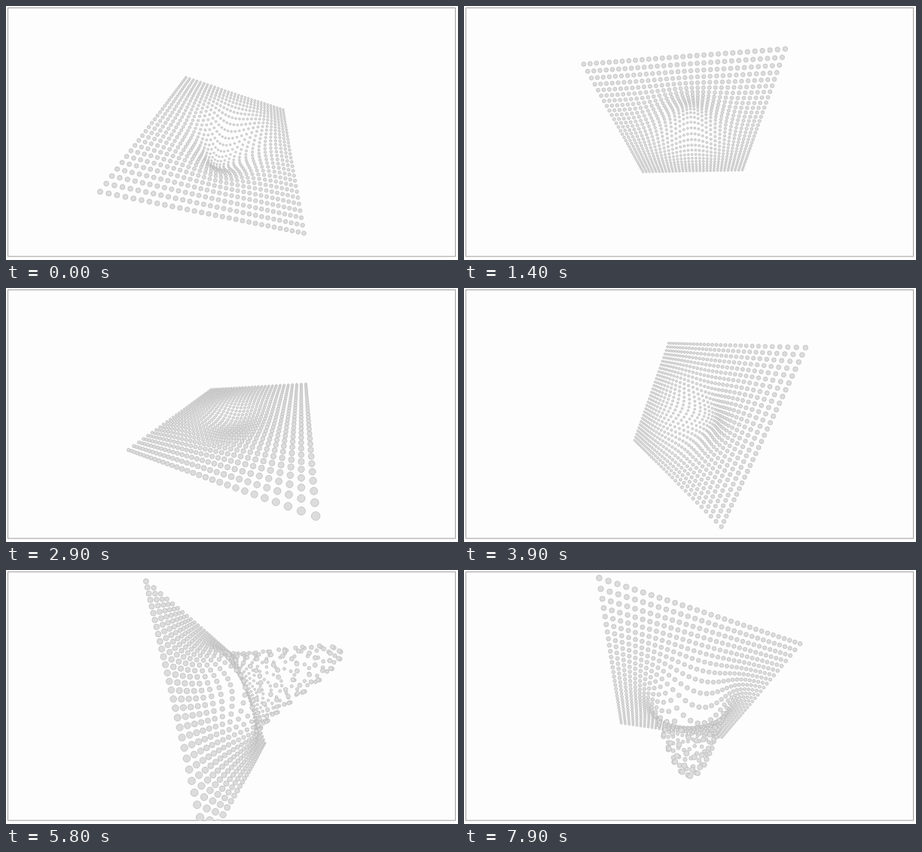
An HTML page with a canvas for the animation above (8000 ms loop, 600 by 338 pixels).

```html
<!DOCTYPE html>
<html lang="en">
<head>
<meta charset="utf-8">
<title>Rotating dot surface</title>
<style>
html, body { margin: 0; width: 100%; height: 100%; overflow: hidden; background: #fdfdfd; }
canvas { display: block; width: 600px; height: 338px; }
</style>
</head>
<body>
<canvas id="stage" width="600" height="338"></canvas>
<script>
const ctx = document.getElementById("stage").getContext("2d");
const { sin, cos, exp, floor, max, PI } = Math;

const LOOP = 8000, STEP = 100;
const HALF = 15;              // the grid runs from -HALF to HALF - 1
const CAMERA = 26.7;          // camera distance in grid cells
const FOCAL = 166;            // focal length in pixels
const CENTER = [299.5, 168];
const DOT = 0.365;            // dot radius in cells, outline included
const OUTLINE = 0.6;
const PEAK = 20.2;            // greatest bump height in cells
const SPREAD = 39;            // squared bump width in cells
const LIFT = 0.2;             // distance of the sheet from the pivot

// Axes of the sheet at time t: x right, y down, z towards the viewer.
function axes(t) {
  const tilt = -0.307 + 0.271 * t;
  const turn = 2.733 - 0.4375 * t;
  const spin = 1.068 - 0.5323 * t;
  const e = [sin(tilt), -cos(tilt) * cos(turn), -cos(tilt) * sin(turn)];
  const g = [0, sin(turn), -cos(turn)];
  return {
    u: [cos(tilt), sin(tilt) * cos(turn), sin(tilt) * sin(turn)],
    v: e.map((c, i) => cos(spin) * c + sin(spin) * g[i]),
    n: e.map((c, i) => sin(spin) * c - cos(spin) * g[i])
  };
}

function surface(t) {
  const { u, v, n } = axes(t);
  const height = -PEAK * cos(0.43 * (t - 6.22));
  const dots = [];
  for (let i = -HALF; i < HALF; i++) {
    for (let j = -HALF; j < HALF; j++) {
      const h = LIFT + height * exp(-(i * i + j * j) / SPREAD);
      const [x, y, z] = u.map((c, k) => i * c - j * v[k] + h * n[k]);
      const scale = FOCAL / (CAMERA - z);
      dots.push({ x: CENTER[0] + x * scale, y: CENTER[1] + y * scale, r: DOT * scale, z });
    }
  }
  return dots.sort((a, b) => a.z - b.z);
}

function draw(t) {
  ctx.fillStyle = "#fdfdfd";
  ctx.fillRect(0, 0, 600, 338);
  ctx.lineWidth = 1;
  ctx.strokeStyle = "#a0a0a0";
  ctx.strokeRect(2.5, 2.5, 594, 330.7);

  ctx.save();
  ctx.beginPath();
  ctx.rect(2, 2, 595, 332);
  ctx.clip();
  ctx.fillStyle = "#dcdcdc";
  ctx.strokeStyle = "#b2b2b2";
  ctx.lineWidth = OUTLINE;
  for (const { x, y, r } of surface(t)) {
    ctx.beginPath();
    ctx.arc(x, y, max(r - OUTLINE / 2, 0.5), 0, 2 * PI);
    ctx.fill();
    ctx.stroke();
  }
  ctx.restore();
}

const start = performance.now();
function tick() {
  const elapsed = (performance.now() - start) % LOOP;
  draw(floor(elapsed / STEP) * STEP / 1000);
  requestAnimationFrame(tick);
}
tick();
</script>
</body>
</html>
```
